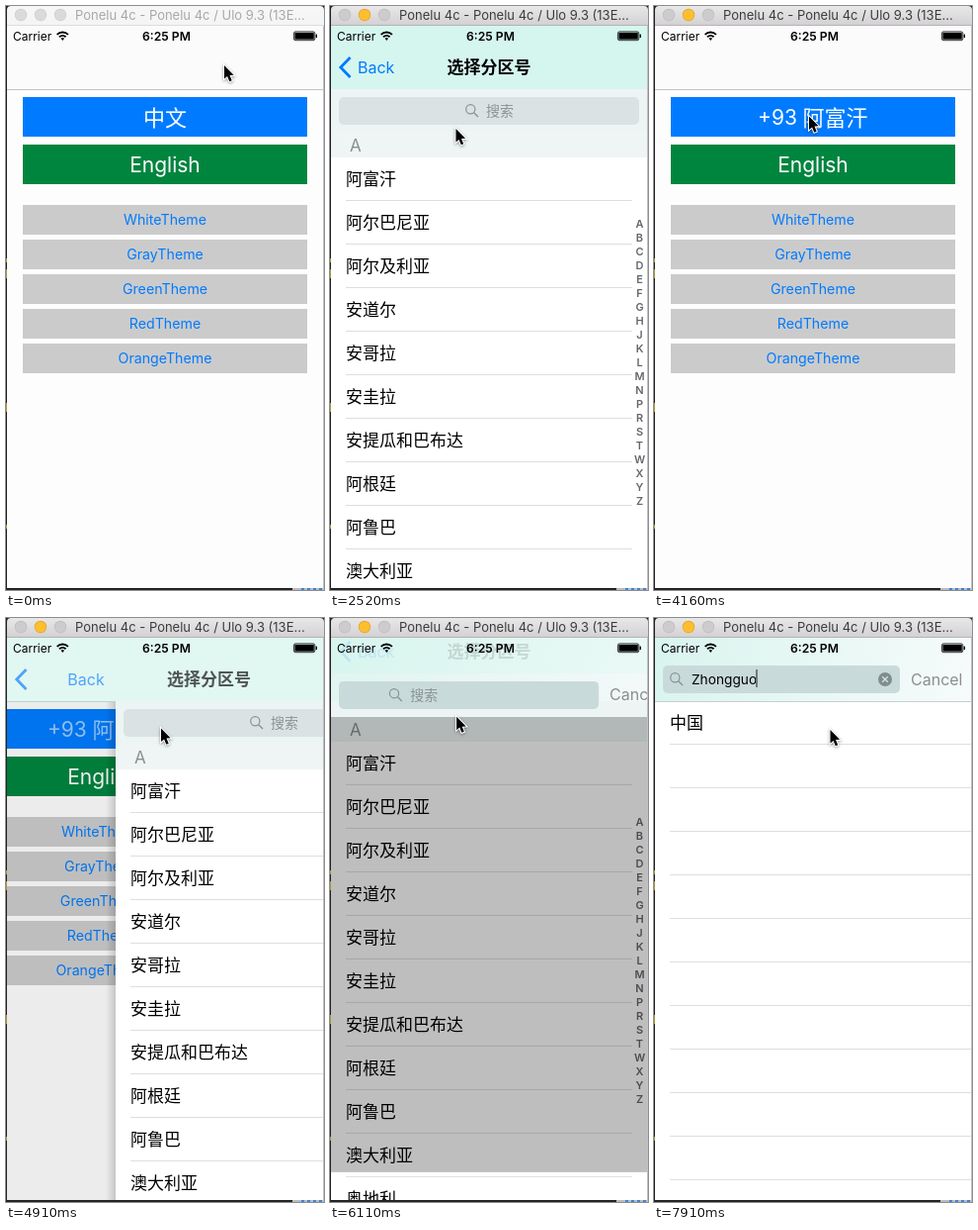
These frames come from a looping animation (322x590 px, 8 s). An HTML page with a canvas:

```html
<!DOCTYPE html>
<html lang="zh-CN">
<head>
<meta charset="utf-8">
<title>Country code picker</title>
<style>
html, body { margin: 0; width: 322px; height: 590px; overflow: hidden; background: #222; }
canvas { display: block; width: 322px; height: 590px; }
</style>
</head>
<body>
<canvas id="stage"></canvas>
<script>
const W = 322, H = 590, LOOP = 8000;
const canvas = document.getElementById('stage');
const scale = window.devicePixelRatio || 1;
canvas.width = W * scale;
canvas.height = H * scale;
const c = canvas.getContext('2d');

const LATIN = 'Inter, "Noto Sans CJK SC", "Noto Sans CJK", sans-serif';
const HAN = '"Noto Sans CJK SC", "Noto Sans CJK", sans-serif';
const BLUE = '#007aff', GRAY = '#8a8f92';

// Screen refreshes come in bursts: first time, last time, count
const bursts = [[740, 1330, 5], [1770, 2670, 7], [2820, 3120, 3], [3420, 4160, 6],
  [4760, 5360, 5], [5960, 6410, 4], [6860, 6860, 1], [7310, 7910, 5]];
const ticks = [0];
for (const [a, b, n] of bursts)
  for (let i = 0; i < n; i++) ticks.push(n > 1 ? Math.round((a + (b - a) * i / (n - 1)) / 10) * 10 : a);

// Pointer path: time, x, y
const path = [[590, 221, 60], [1330, 158.5, 114.5], [2220, 158.5, 114.5], [2520, 127.5, 124],
  [2670, 125, 150], [3120, 99, 183], [3720, 99, 183], [4160, 157, 111.5],
  [4910, 157, 111.5], [5360, 110.5, 95], [5960, 110.5, 95], [6410, 178.5, 113]];

const countries = ['阿富汗', '阿尔巴尼亚', '阿尔及利亚', '安道尔', '安哥拉', '安圭拉',
  '安提瓜和巴布达', '阿根廷', '阿鲁巴', '澳大利亚', '奥地利', '阿曼'];
const themes = ['White', 'Gray', 'Green', 'Red', 'Orange'];
const letters = 'ABCDEFGHJKLMNPRSTWXYZ';

const clamp = v => Math.max(0, Math.min(1, v));
const lerp = (a, b, u) => a + (b - a) * u;
const smooth = u => u * u * (3 - 2 * u);
const easeOut = u => 1 - Math.pow(1 - clamp(u), 3);

function rect(x, y, w, h, fill) {
  c.fillStyle = fill;
  c.fillRect(x, y, w, h);
}

function text(s, x, y, size, fill, align = 'left', weight = 400, family = LATIN) {
  c.font = `${weight} ${size}px ${family}`;
  c.textAlign = align;
  c.fillStyle = fill;
  c.fillText(s, x, y);
}

function line(points, color, width) {
  c.strokeStyle = color;
  c.lineWidth = width;
  c.beginPath();
  points.forEach(([x, y]) => c.lineTo(x, y));
  c.stroke();
}

function dot(x, y, r, fill) {
  c.fillStyle = fill;
  c.beginPath();
  c.arc(x, y, r, 0, 7);
  c.fill();
}

function faded(alpha, draw) {
  if (alpha <= 0) return;
  c.save();
  c.globalAlpha *= alpha;
  draw();
  c.restore();
}

function drawDesktop() {
  rect(0, 0, W, H, '#232325');
  for (const [y, h] of [[255, 4], [266, 9], [401, 9], [524, 4]]) rect(0, y, 1, h, '#a89a35');
  rect(321, 20, 1, 568, '#c2c2c4');
  rect(290, 588, 32, 2, '#b9bcc0');
  for (let x = 299; x < 320; x += 6) rect(x, 588, 3, 2, '#3b86d8');
}

function drawTitleBar(active) {
  const g = c.createLinearGradient(0, 0, 0, 20);
  g.addColorStop(0, active ? '#e9e8e9' : '#f7f7f7');
  g.addColorStop(1, active ? '#d2d0d2' : '#f4f4f4');
  c.fillStyle = g;
  c.beginPath();
  c.roundRect(1, 0, 321, 20, [4, 4, 0, 0]);
  c.fill();
  rect(1, 19, 321, 1, active ? '#b5b3b5' : '#dcdcdc');
  const off = active ? '#cdcbcd' : '#dadada';
  [off, active ? '#fdbe2f' : off, off].forEach((fill, i) => {
    dot(15 + 20 * i, 9, 6.2, active ? (i === 1 ? '#dfa023' : '#bdbbbd') : '#cecece');
    dot(15 + 20 * i, 9, 5.6, fill);
  });
  text('Ponelu 4c - Ponelu 4c / Ulo 9.3 (13E...', 70, 14, 13, active ? '#3c3c3c' : '#a8a8a8');
}

function drawStatus() {
  text('Carrier', 7, 34.5, 12, '#000');
  text('6:25 PM', 162.5, 34.5, 12.2, '#000', 'center', 600);
  c.strokeStyle = '#000';
  c.lineWidth = 1.8;
  for (const r of [4.6, 8]) {
    c.beginPath();
    c.arc(57.3, 34.5, r, -Math.PI * .75, -Math.PI * .25);
    c.stroke();
  }
  c.fillStyle = '#000';
  c.beginPath();
  c.moveTo(57.3, 35);
  c.arc(57.3, 34.5, 2.4, -Math.PI * .75, -Math.PI * .25);
  c.fill();
  c.lineWidth = .8;
  c.beginPath();
  c.roundRect(291.4, 25.9, 21.4, 8.8, 1.8);
  c.stroke();
  rect(292.4, 26.9, 19.4, 6.8, '#000');
  rect(313.6, 28.6, 1.4, 3.4, '#000');
}

function drawHome(picked, labelAlpha) {
  rect(1, 20, 320, 568, '#fdfdfd');
  rect(17, 92, 288, 40, '#007bff');
  faded(labelAlpha, () => {
    if (picked) {
      text('+93', 105, 120, 21, '#fff');
      text('阿富汗', 150.5, 120.5, 22, '#fff', 'left', 400, HAN);
    } else text('中文', 161, 120.5, 22, '#fff', 'center', 400, HAN);
  });
  rect(17, 140, 288, 40, '#00853f');
  text('English', 161, 168, 21, '#fff', 'center');
  themes.forEach((name, i) => {
    rect(17, 201 + 35 * i, 288, 30, '#cbcbcb');
    text(name + 'Theme', 161, 221.3 + 35 * i, 14.2, BLUE, 'center');
  });
}

function drawList(s, query, selected) {
  const dy = -44 * s;
  rect(1, 20, 320, 568, '#fff');
  if (query) {
    text('中国', 16, 112.3, 17, '#000', 'left', 400, HAN);
    for (let y = 127; y < 588; y += 44) rect(16, y, 305, 1, '#dedee0');
    return;
  }
  if (selected) rect(1, 153, 320, 44, '#d9d9d9');
  countries.forEach((name, i) => {
    text(name, 16, 181.3 + 44 * i + dy, 17, '#000', 'left', 400, HAN);
    rect(16, 196 + 44 * i + dy, 290, 1, '#dedee0');
  });
  [...letters].forEach((ch, i) =>
    text(ch, 313.5, 224 + 14 * i - 22 * s, 11, '#66666e', 'center', 600));
  rect(1, 128 + dy, 320, 25, '#eff5f5');
  text('A', 20, 147 + dy, 17, GRAY);
  if (s > 0) rect(1, 128 + dy, 320, 460, `rgba(0,0,0,${.4 * s})`);
}

function drawSearch(s, query, caret) {
  const dy = -44 * s, dx = -121 * s, ink = '#8a9395';
  rect(1, 84 + dy, 320, 44, '#edf5f4');
  faded(s, () => {
    const g = c.createLinearGradient(1, 40, 321, 84);
    g.addColorStop(0, '#d9f4ee');
    g.addColorStop(1, '#f6fbfb');
    rect(1, 20, 320, 64, g);
  });
  c.fillStyle = s < .5 ? '#dae2e3' : '#c9dada';
  c.beginPath();
  c.roundRect(9, 92 + dy, lerp(304, 240, s), 28, 5);
  c.fill();
  c.strokeStyle = ink;
  c.lineWidth = 1.2;
  c.beginPath();
  c.arc(142.3 + dx, 104.3 + dy, 4.6, 0, 7);
  c.stroke();
  line([[145.7 + dx, 107.7 + dy], [150 + dx, 112 + dy]], ink, 1.4);
  if (query) text(query, 38, 67, 13.7, '#000');
  else text('搜索', lerp(158, 38, s), 111.2 + dy, 14, ink, 'left', 400, HAN);
  if (s > 0) text('Cancel', lerp(324, 260, s), 111.5 + dy, 16, GRAY);
  if (caret) {
    c.font = `400 13.7px ${LATIN}`;
    const x = query ? Math.round(38 + c.measureText(query).width) - 1 : 37;
    rect(x, 52, 2, 18, '#6f7b7d');
  }
  if (query) {
    dot(234, 62, 7, '#7f8d8f');
    line([[231.2, 59.2], [236.8, 64.8]], '#d5e3e2', 1.3);
    line([[236.8, 59.2], [231.2, 64.8]], '#d5e3e2', 1.3);
    rect(1, 84, 320, 1, '#c9cecf');
  }
}

function drawNav(p, s) {
  const dy = -44 * s;
  rect(1, 20, 320, 64 + dy, '#fbfbfb');
  faded(p, () => rect(1, 20, 320, 64 + dy, '#d5f6ee'));
  faded(1 - s, () => rect(1, 84 + dy, 320, 1, p > .5 ? '#b9d3cd' : '#c3c3c4'));
  faded(p * (1 - s), () => {
    text('选择分区号', 161 + 130 * (1 - p), 68.3 + dy, 17, '#000', 'center', 700, HAN);
    text('Back', 28 + 100 * (1 - p), 68 + dy, 16, BLUE);
    line([[20.5, 52 + dy], [10.8, 62 + dy], [20.5, 72 + dy]], BLUE, 2.8);
  });
}

function drawPointer(x, y) {
  const shape = [[0, 0], [0, 13.6], [3.1, 10.9], [5.3, 16.2], [7.7, 15.2], [5.5, 10], [9.6, 9.8]];
  c.save();
  c.translate(x, y);
  c.beginPath();
  shape.forEach(([a, b]) => c.lineTo(a, b));
  c.closePath();
  c.shadowColor = 'rgba(0,0,0,.4)';
  c.shadowBlur = 3 * scale;
  c.shadowOffsetY = scale;
  c.strokeStyle = '#fff';
  c.lineWidth = 2;
  c.stroke();
  c.shadowColor = 'transparent';
  c.fillStyle = '#000';
  c.fill();
  c.restore();
}

function pointerAt(t) {
  const i = path.findIndex(k => k[0] > t);
  if (i === 0) return path[0].slice(1);
  if (i < 0) return path[path.length - 1].slice(1);
  const [t0, x0, y0] = path[i - 1], [t1, x1, y1] = path[i];
  const u = smooth((t - t0) / (t1 - t0));
  return [lerp(x0, x1, u), lerp(y0, y1, u)];
}

// How far the list has slid over the home screen
function pushAt(t) {
  if (t < 3420) return easeOut((t - 1770) / 500);
  if (t < 4760) return 1 - easeOut((t - 3350) / 500);
  return easeOut((t - 4760) / 500);
}

function queryAt(t) {
  if (t < 7310) return '';
  return 'Zhongguo'.slice(0, Math.min(8, 1 + Math.round((t - 7310) / 600 * 7)));
}

function draw(t) {
  const p = pushAt(t) > .995 ? 1 : pushAt(t);
  const s = smooth(clamp((t - 5920) / 320));
  const query = queryAt(t);
  const sliding = p < 1 && (p > 0 || t === 1770 || t === 4760);
  const press = t >= 4760 ? t - 4760 : t >= 1770 && t < 3420 ? t - 1770 : 9999;
  const x = p === 1 ? 0 : Math.round(320 * (1 - p));

  c.setTransform(scale, 0, 0, scale, 0, 0);
  drawDesktop();
  c.save();
  c.beginPath();
  c.rect(1, 20, 320, 568);
  c.clip();
  if (p < 1) {
    c.save();
    c.translate(-96 * p, 0);
    drawHome(t >= 3420, lerp(.2, 1, clamp(press / 300)));
    c.restore();
    rect(1, 84, 320, 504, `rgba(0,0,0,${.1 * p})`);
  }
  if (sliding) {
    const g = c.createLinearGradient(x - 9, 0, x + 1, 0);
    g.addColorStop(0, 'rgba(0,0,0,0)');
    g.addColorStop(1, 'rgba(0,0,0,.16)');
    rect(x - 9, 84, 10, 504, g);
  }
  if (p > 0) {
    c.save();
    c.translate(x, 0);
    drawList(s, query, t >= 3420 && t < 4160);
    c.restore();
  }
  drawNav(p, s);
  if (p > 0) {
    c.save();
    c.translate(x, 0);
    drawSearch(s, query, query || (t >= 6260 && t < 6860));
    c.restore();
  }
  drawStatus();
  c.restore();
  drawTitleBar(t >= 1770);
  drawPointer(...pointerAt(t));
}

const start = performance.now();
function frame() {
  const now = (performance.now() - start) % LOOP;
  draw(ticks.filter(k => k <= now).pop());
  requestAnimationFrame(frame);
}
frame();
</script>
</body>
</html>
```
